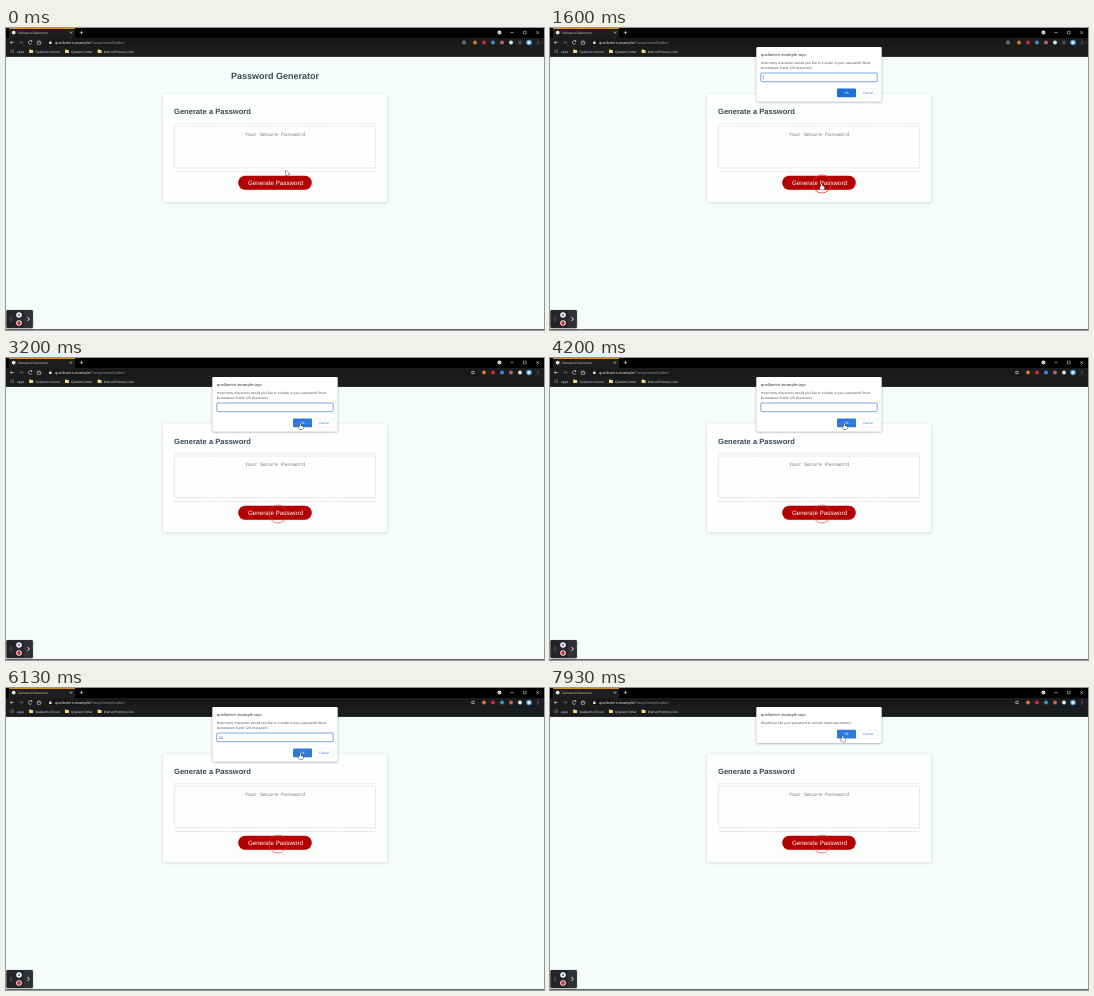
Recreate the animation shown at these times as an HTML page with a canvas. Size 538x302 px, loop 8000 ms.

```html
<!DOCTYPE html>
<html lang="en">
<head>
<meta charset="utf-8">
<title>Password Generator</title>
<style>
  html, body { margin: 0; width: 100%; height: 100%; overflow: hidden; background: #f6fcfc; }
  canvas { display: block; width: 538px; height: 302px; }
</style>
</head>
<body>
<canvas id="stage"></canvas>
<script>
const W = 538, H = 302, LOOP = 8000, CENTER = W / 2;
const canvas = document.getElementById('stage');
const ctx = canvas.getContext('2d');
const ratio = window.devicePixelRatio || 1;
canvas.width = W * ratio;
canvas.height = H * ratio;

const UI = '"Open Sans", "Noto Sans", sans-serif';
const ARIAL = '"Liberation Sans", Arial, sans-serif';
const MONO = '"Liberation Mono", monospace';
const HOST = 'quellamirn.example';
const LIGHT = '#e8eaed', DIM = '#777a7f', INK = '#3b4954', BODY = '#3c4043';

const RING_AT = 1300, PROMPT_AT = 1500, COMPACT_AT = 1950, CONFIRM_AT = 6400;
const TYPE_AT = 5300, TYPE_STEP = 260, TYPED = '20';

const START = { x: 280, y: 142.5 };
const MOVES = [
  { x: 271.6, y: 156, from: 60, to: 600 },
  { x: 294.4, y: 65.6, from: 1800, to: 2600 },
  { x: 292.8, y: 48, from: 7330, to: 7860 }
];

const clamp = v => Math.max(0, Math.min(1, v));
const ease = u => u * u * (3 - 2 * u);

function paint(fill, stroke, line = 0.5) {
  if (fill) { ctx.fillStyle = fill; ctx.fill(); }
  if (stroke) { ctx.strokeStyle = stroke; ctx.lineWidth = line; ctx.stroke(); }
}

function box(x, y, w, h, r, fill, stroke, line) {
  ctx.beginPath();
  ctx.roundRect(x, y, w, h, r);
  paint(fill, stroke, line);
}

const centered = (y, w, h, ...look) => box(CENTER - w / 2, y, w, h, ...look);

function dot(x, y, r, fill, stroke, line) {
  ctx.beginPath();
  ctx.arc(x, y, r, 0, Math.PI * 2);
  paint(fill, stroke, line);
}

// A stroke through the centre, extending r both ways
function dash(x, y, r, turn = 0, color = LIGHT) {
  const dx = r * Math.cos(turn), dy = r * Math.sin(turn);
  ctx.beginPath();
  ctx.moveTo(x - dx, y - dy);
  ctx.lineTo(x + dx, y + dy);
  paint(null, color, 0.6);
}

function cross(x, y, r, turn, color) {
  dash(x, y, r, turn, color);
  dash(x, y, r, turn + Math.PI / 2, color);
}

// Points right at turn 0
function chevron(x, y, r, turn = 0, color = LIGHT, line = 0.6) {
  ctx.save();
  ctx.translate(x, y);
  ctx.rotate(turn);
  ctx.beginPath();
  ctx.moveTo(-r, -r);
  ctx.lineTo(0, 0);
  ctx.lineTo(-r, r);
  ctx.restore();
  paint(null, color, line);
}

// The minute skew turns off glyph hinting, which distorts very small text
function text(s, x, y, font, color, align = 'left') {
  ctx.save();
  ctx.transform(1, 0.0002, 0.0002, 1, x, y);
  ctx.textRendering = 'geometricPrecision';
  ctx.font = font;
  ctx.fillStyle = color;
  ctx.textAlign = align;
  ctx.fillText(s, 0, 0);
  const width = ctx.measureText(s).width;
  ctx.restore();
  return width;
}

const label = (s, x, y, size, color, align) => text(s, x, y, `${size}px ${UI}`, color, align);

function shadowed(blur, alpha, draw) {
  ctx.save();
  ctx.shadowColor = `rgba(0,0,0,${alpha})`;
  ctx.shadowBlur = blur * ratio;
  ctx.shadowOffsetY = 0.5 * ratio;
  draw();
  ctx.restore();
}

function drawTabs() {
  const y = 4.6;
  box(0, 0, W, 10, 0, '#000');
  box(3, 0, 66, 10, [2, 2, 0, 0], '#1d1e20');
  box(3, 0, 66, 0.9, 0, '#e08a1e');
  dot(7.7, y, 1.9, LIGHT);
  label('Password Generator', 12.2, y + 1.2, 3.15, '#f1dcb4');
  cross(65, y, 1.5, Math.PI / 4);
  cross(75.5, y, 1.8, 0);
  dot(493.4, y, 2, LIGHT);
  chevron(493.4, y + 0.6, 0.8, Math.PI / 2, '#222');
  dash(506, y, 1.5);
  box(517.5, y - 1.4, 2.7, 2.7, 0, null, LIGHT);
  cross(531.6, y, 1.9, Math.PI / 4);
}

function drawStar(x, y) {
  ctx.beginPath();
  for (let i = 0; i < 10; i++) {
    const a = -Math.PI / 2 + i * Math.PI / 5, r = i % 2 ? 0.9 : 1.9;
    ctx.lineTo(x + r * Math.cos(a), y + r * Math.sin(a));
  }
  ctx.closePath();
  paint(null, LIGHT);
}

function drawToolbar(t) {
  const y = 14.5, gap = 9, shift = t >= COMPACT_AT ? gap : 0;
  box(0, 10, W, 18.7, 0, '#1b1c1e');
  box(40, y - 3.6, 423 + shift, 7.2, 3.6, '#17181a');

  for (const [x, way, color] of [[6, -1, LIGHT], [15, 1, DIM]]) {
    dash(x, y, 1.7, 0, color);
    chevron(x + 1.7 * way, y, 1.6, way < 0 ? Math.PI : 0, color);
  }
  ctx.beginPath();
  ctx.arc(24.2, y, 1.8, 0.5, 5.6);
  paint(null, LIGHT, 0.6);
  box(24.9, y - 2, 1.2, 1.2, 0, LIGHT);
  chevron(33, y - 2, 2, -Math.PI / 2);
  box(31.5, y - 0.5, 3, 2.4, 0, null, LIGHT);
  box(43.2, y - 0.4, 2.3, 2, 0.3, LIGHT);
  dot(44.35, y - 0.6, 0.8, null, LIGHT, 0.4);

  const hostWidth = label(HOST, 49, y + 1.2, 3.75, '#f1f2f4');
  label('/PassphraseBuilder/', 49 + hostWidth, y + 1.2, 3.75, '#989ba0');

  drawStar(458 + shift, y);
  ['#d9822b', '#c62f36', '#3c8fd0', '#b3686b', '#eceff1'].forEach((color, i) =>
    dot(469 + i * gap + shift, y, 1.9, color));
  for (let i = -1; i <= 1; i++) {
    if (!shift) dash(514, y + i * 1.3, 1.8, 0, DIM);
    dot(532, y + i * 1.5, 0.4, LIGHT);
  }
  dot(523, y, 2.8, '#4b9be0');
  dot(523, y, 1.6, '#e3eefa');
}

function drawBookmarks() {
  const y = 23.4;
  for (let i = 0; i < 9; i++) {
    box(4.4 + (i % 3) * 1.3, y - 1.8 + Math.floor(i / 3) * 1.3, 0.9, 0.9, 0, ['#db5147', '#5b9a61', '#5588d0'][i % 3]);
  }
  label('Apps', 11, y + 1.1, 3.1, LIGHT);
  let x = 23.2;
  for (const name of ["Quellam's School", 'Quellam Other', 'Marisol Pottery Links']) {
    box(x, y - 1.9, 1.9, 1.2, 0.3, '#f3d775');
    box(x, y - 1.4, 3.9, 3.1, 0.3, '#f3d775');
    x += 11.2 + label(name, x + 6.2, y + 1.1, 3.1, LIGHT);
  }
}

function drawPage(t) {
  const inner = 202, left = CENTER - inner / 2;
  box(0, 28.7, W, H, 0, '#f6fcfc');
  text('Password Generator', CENTER, 50.9, `bold 9px ${ARIAL}`, INK, 'center');
  shadowed(2.5, 0.2, () => centered(65.8, 224.6, 108.8, 1.5, '#fdfefe'));
  text('Generate a Password', left, 86.2, `bold 7.57px ${ARIAL}`, INK);
  for (const y of [95.1, 142.9]) box(left, y, inner, 0.5, 0, '#d9dcde');
  ctx.setLineDash([1.7, 1.1]);
  centered(98, inner - 0.6, 41.8, 0.8, null, '#b5b8ba');
  ctx.setLineDash([]);
  text('Your Secure Password', CENTER, 107.6, `5px ${MONO}`, '#757575', 'center');
  shadowed(1.5, 0.12, () => centered(147.7, 73.6, 14, 7, '#b30000'));
  text('Generate Password', CENTER + 0.5, 156.8, `6.22px ${ARIAL}`, '#fff', 'center');

  if (t >= RING_AT) {
    const grow = clamp((t - RING_AT) / 200);
    dot(272, 156, 3 + 6 * grow, null, `rgba(232,55,35,${t < COMPACT_AT ? 0.8 : 0.6})`, 1);
  }
}

function drawDialog(height, message, hover) {
  const left = 210.8, top = 19, y = top + height - 13.2;
  shadowed(2, 0.4, () => centered(top, 125.4, height, 1.2, '#fff'));
  label(HOST + ' says', left, top + 8.8, 3.9, '#202124');
  message.forEach((line, i) => label(line, left, top + 16.7 + i * 5.6, 3.3, BODY));
  box(287, y, 19, 8.7, 1.1, hover ? '#3079da' : '#1a6fd8');
  label('OK', 296.4, y + 5.5, 3.2, '#fff', 'center');
  box(308.6, y, 18.7, 8.7, 1.1, '#fff', '#dfe2e6', 0.35);
  label('Cancel', 318, y + 5.5, 3.3, '#2873d5', 'center');
}

function drawPrompt(t) {
  drawDialog(54.8, [
    'How many characters would you like to include in your password? Must',
    'be between 8 and 128 characters.'
  ], t >= 2550);
  centered(45, 116.4, 8.7, 0.8, '#fff', '#3f83dc', 0.7);
  const count = Math.max(0, Math.min(TYPED.length, 1 + Math.floor((t - TYPE_AT) / TYPE_STEP)));
  const width = label(TYPED.slice(0, count), 212.8, 50.5, 3.3, '#202124');
  const idle = t - (count ? TYPE_AT + (count - 1) * TYPE_STEP : PROMPT_AT);
  if (idle % 1000 < 500) box(212.9 + width, 47.3, 0.4, 4, 0, '#222');
}

function drawRecorder() {
  const x = 13, y = 291;
  shadowed(1.5, 0.5, () => box(0.6, y - 9, 26.3, 18, 1.2, '#303134'));
  box(0.6, y - 9, 17.2, 18, [1.2, 0, 0, 1.2], '#242528');
  for (let i = 0; i < 6; i++) dot(4.4 + (i % 2) * 1.4, y + (Math.floor(i / 2) - 1) * 1.9, 0.4, '#a5a7aa');
  for (const side of [-1, 1]) dot(x, y + 4 * side, 2.8, '#f1f1f1');
  cross(x, y - 4, 1.6, Math.PI / 4, '#333');
  dot(x, y + 4, 1.9, '#d92c2c');
  chevron(23.4, y, 1.9, 0, '#fff', 0.9);
  box(0, H - 0.8, W, 0.8, 0, '#303236');
}

function pointerAt(t) {
  return MOVES.reduce((p, m) => {
    const k = ease(clamp((t - m.from) / (m.to - m.from)));
    return { x: p.x + (m.x - p.x) * k, y: p.y + (m.y - p.y) * k };
  }, START);
}

const HAND = new Path2D();
HAND.roundRect(-0.6, 0, 1.3, 4, 0.6);
HAND.roundRect(-1.8, 2.3, 4.6, 3.4, 1.2);
const ARROW = new Path2D('M0 0V5L1.2 3.9L2 5.8L2.9 5.4L2.1 3.6H3.6Z');

function drawPointer(t) {
  const { x, y } = pointerAt(t);
  const overButton = y > 148 && y < 162;
  const shape = overButton || t >= 2450 ? HAND : ARROW;
  ctx.save();
  ctx.translate(x, y);
  ctx.strokeStyle = '#222';
  ctx.lineWidth = 0.8;
  ctx.stroke(shape);
  ctx.fillStyle = '#fff';
  ctx.fill(shape);
  ctx.restore();
}

function render(t) {
  ctx.setTransform(ratio, 0, 0, ratio, 0, 0);
  drawPage(t);
  drawTabs();
  drawToolbar(t);
  drawBookmarks();
  if (t >= CONFIRM_AT) {
    drawDialog(36, ['Would you like your password to contain lowercase letters?'], t >= 7760);
  } else if (t >= PROMPT_AT) {
    drawPrompt(t);
  }
  drawRecorder();
  drawPointer(t);
}

const start = performance.now();
function tick() {
  render((performance.now() - start) % LOOP);
  requestAnimationFrame(tick);
}
tick();
</script>
</body>
</html>
```
